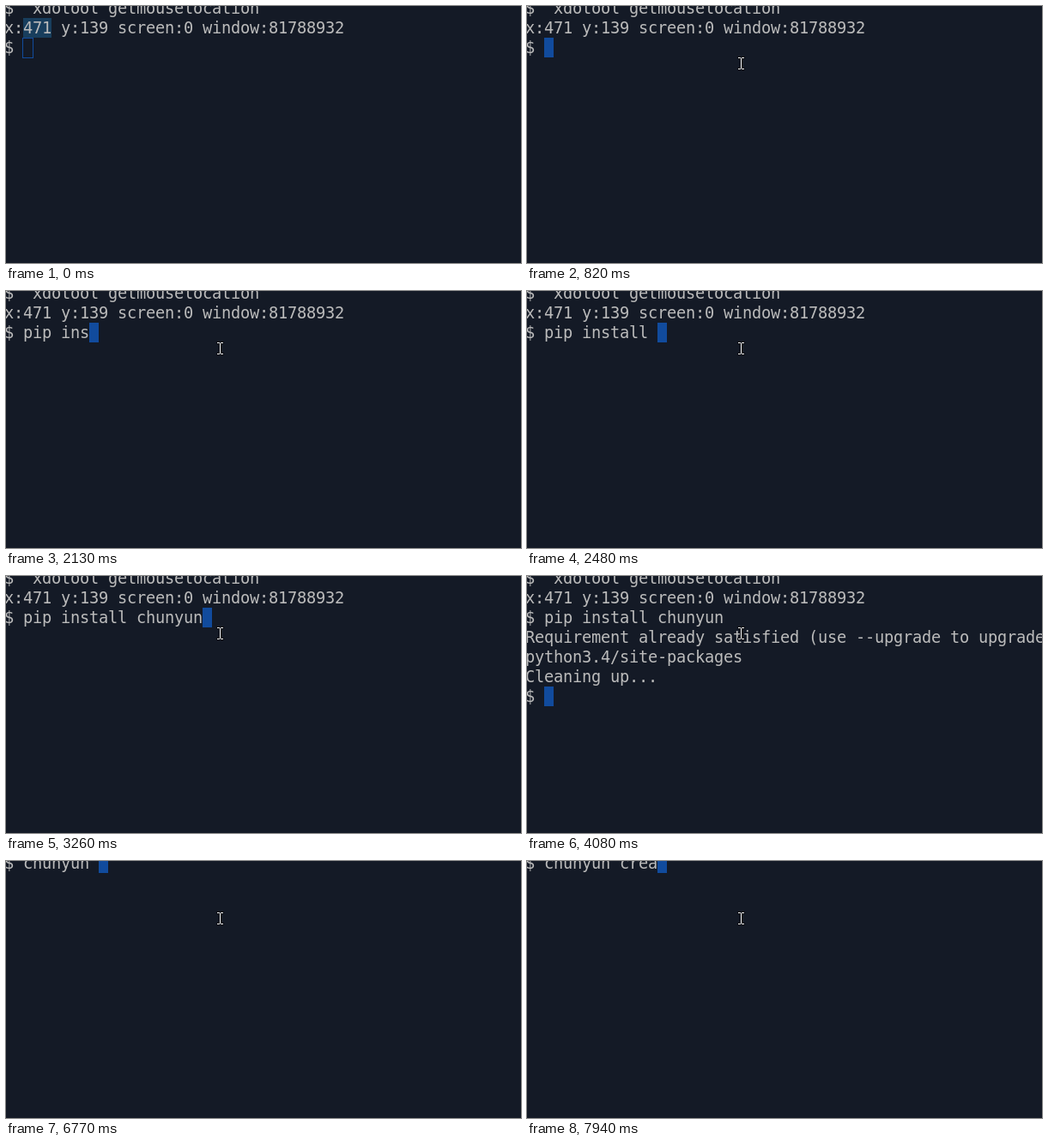
An HTML page with a canvas that plays this animation: 600x300 px, repeating every 8 s.

```html
<!DOCTYPE html>
<html lang="en">
<head>
<meta charset="utf-8">
<title>Terminal session</title>
<style>
  html, body { margin: 0; width: 100%; height: 100%; overflow: hidden; background: #141a26; }
  canvas { display: block; }
</style>
</head>
<body>
<canvas id="stage" width="600" height="300"></canvas>
<script>
const ctx = document.getElementById('stage').getContext('2d');

const LOOP = 8000;
const CELL = { w: 11, h: 23, left: -2, top: -9, base: 18 };
const COLOR = { back: '#141a26', text: '#bbbbbb', cursor: '#114b9d', select: '#183e5d' };
const FONT = '18.67px "DejaVu Sans Mono", monospace';

const HISTORY = ['$  xdotool getmouselocation', 'x:471 y:139 screen:0 window:81788932'];
const OUTPUT = [
  'Requirement already satisfied (use --upgrade to upgrade',
  'python3.4/site-packages',
  'Cleaning up...'
];

const FOCUS = 580, CLICK = 820, ENTER = 3480, PRINT = 4040, PROMPT = 4080, CLEAR = 5550;

// Each entry is the time at which one more character appears.
const INSTALL = {
  text: 'pip install chunyun',
  keys: [1470, 1600, 1730, 1820, 1910, 2000, 2090, 2170, 2260, 2260,
         2390, 2480, 2610, 2650, 2650, 2820, 3040, 3080, 3260]
};
const CREATE = {
  text: 'chunyun crea',
  keys: [5890, 5930, 5970, 6150, 6370, 6370, 6590, 6770, 7600, 7820, 7880, 7940]
};

const typed = (cmd, t) => '$ ' + cmd.text.slice(0, cmd.keys.filter(k => k <= t).length);
const colX = col => CELL.left + col * CELL.w;
const rowY = row => CELL.top + row * CELL.h;

function fillCells(col, row, count, color) {
  ctx.fillStyle = color;
  ctx.fillRect(colX(col), rowY(row), count * CELL.w, CELL.h);
}

function drawLine(line, row) {
  ctx.fillStyle = COLOR.text;
  [...line].forEach((ch, col) => {
    if (ch !== ' ') ctx.fillText(ch, colX(col), rowY(row) + CELL.base);
  });
}

function screenLines(t) {
  if (t >= CLEAR) return [typed(CREATE, t)];
  const lines = [...HISTORY, typed(INSTALL, t)];
  if (t >= PRINT) lines.push(...OUTPUT);
  if (t >= PROMPT) lines.push('$ ');
  else if (t >= ENTER) lines.push('');
  return lines;
}

function drawCursor(col, row, focused) {
  if (focused) {
    fillCells(col, row, 1, COLOR.cursor);
  } else {
    ctx.strokeStyle = COLOR.cursor;
    ctx.lineWidth = 1;
    ctx.strokeRect(colX(col) - 0.5, rowY(row) + 0.5, CELL.w + 1, CELL.h);
  }
}

function beam(x, y, grow, color) {
  ctx.fillStyle = color;
  const bar = (dx, dy, w, h) =>
    ctx.fillRect(x + dx - grow, y + dy - grow, w + 2 * grow, h + 2 * grow);
  bar(-3, -7, 3, 1);
  bar(1, -7, 3, 1);
  bar(0, -6, 1, 12);
  bar(-3, 6, 3, 1);
  bar(1, 6, 3, 1);
}

function drawPointer(t) {
  if (t < FOCUS) return;
  const steps = 5;
  const p = Math.min(1, Math.floor((t - FOCUS) / (CLICK - FOCUS) * steps) / steps);
  const ease = 1 - (1 - p) ** 2;
  const x = Math.round(17 + 232 * ease);
  const y = Math.round(2 + 65 * ease);
  beam(x, y, 1, '#0b0e15');
  beam(x, y, 0, '#ffffff');
}

function draw(t) {
  ctx.fillStyle = COLOR.back;
  ctx.fillRect(0, 0, 600, 300);
  ctx.font = FONT;
  ctx.textBaseline = 'alphabetic';

  const lines = screenLines(t);
  const last = lines.length - 1;
  if (t < CLICK) fillCells(2, 1, 3, COLOR.select);
  drawCursor(lines[last].length, last, t >= FOCUS);
  lines.forEach(drawLine);
  drawPointer(t);
}

const start = performance.now();
function tick() {
  draw((performance.now() - start) % LOOP);
  requestAnimationFrame(tick);
}
tick();
</script>
</body>
</html>
```
